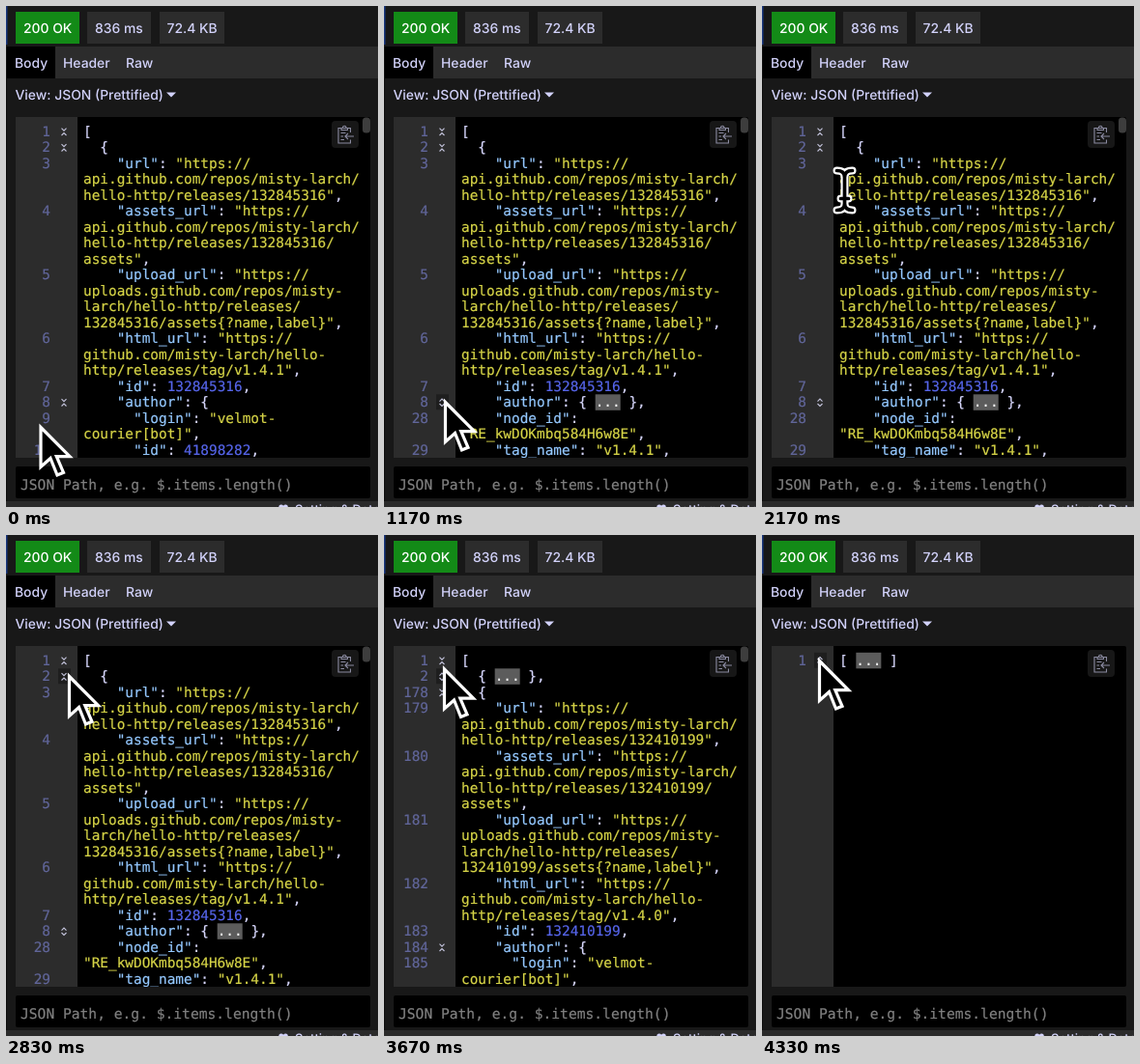
Recreate the animation shown at these times as an HTML page. Size 385 by 519 pixels, loop 4.67 s.

```html
<!DOCTYPE html>
<html lang="en">
<head>
<meta charset="utf-8">
<title>JSON folding</title>
<style>
html, body { margin: 0; width: 100%; height: 100%; overflow: hidden; background: #181818; }
svg { display: block; }
text { white-space: pre; text-rendering: geometricPrecision; }
.ui { font: 500 13.9px Inter, sans-serif; fill: #d2d2fa; }
.mono {
  font-family: "DejaVu Sans Mono", monospace; font-size: 14.4px;
  fill: currentColor; stroke: currentColor; stroke-width: 0.2;
}
.key { color: #94c8ff; }
.str { color: #d6d447; }
.num { color: #5665ea; }
.dots { color: #f0f0f0; }
.punct { color: #d6d6fb; }
.line { color: #61669a; text-anchor: end; }
.hint { color: #808080; font-size: 14.62px; }
.fold { fill: none; stroke: #c4c4dc; stroke-width: 1.1; }
</style>
</head>
<body>
<svg width="385" height="519" viewBox="0 0 385 519">
  <defs><clipPath id="pane"><rect x="10" y="115" width="367" height="353"/></clipPath></defs>
  <rect width="385" height="519" fill="#181818"/>
  <rect width="1.5" height="40" fill="#16347c"/>
  <rect x="10" y="6" width="66" height="33" fill="#138a17"/>
  <rect x="84" y="6" width="66" height="33" fill="#2c2c2c"/>
  <rect x="159" y="6" width="67" height="33" fill="#2c2c2c"/>
  <rect x="1" y="42" width="384" height="33" fill="#2c2c2c"/>
  <rect x="1" y="42" width="50" height="33" fill="#000"/>
  <rect y="42" width="1" height="477" fill="#0c0c0c"/>
  <g class="ui">
    <text x="18" y="27.700" fill="#fff">200 OK</text>
    <text x="92" y="27.700">836 ms</text>
    <text x="166.500" y="27.700">72.4 KB</text>
    <text x="9" y="64">Body</text>
    <text x="59" y="64">Header</text>
    <text x="124" y="64">Raw</text>
    <text x="9.500" y="96.700">View: JSON (Prettified)</text>
    <path d="M166 89.500h10l-5 5z"/>
  </g>
  <rect x="10" y="115" width="367" height="353" rx="2" fill="#000"/>
  <rect x="10" y="115" width="64" height="353" fill="#2c2c2c"/>
  <g id="code" clip-path="url(#pane)"></g>
  <rect id="thumb" x="369" y="115.500" width="8" height="16" rx="3.500" fill="#3d3d3d"/>
  <rect x="337" y="119" width="28" height="28" rx="4" fill="#171717"/>
  <g fill="none" stroke="#8a8aa0" stroke-width="1.100">
    <path d="M356.500 131v-4.500h-12.500v15.500h12.500v-3.500M347 126.500v2h6.500v-2M348.500 126a1.750 1.750 0 0 1 3.500 0"/>
    <path d="M360 135h-9M354 132l-3 3 3 3M346.500 131.500h5M346.500 135h2.500M346.500 138.500h3.500"/>
  </g>
  <rect x="10" y="477" width="367" height="33" rx="2" fill="#000"/>
  <text class="mono hint" x="15" y="501.300">JSON Path, e.g. $.items.length()</text>
  <rect y="513" width="385" height="6" fill="#2a2a2a"/>
  <g class="ui">
    <circle cx="284.800" cy="519" r="2.500"/>
    <circle cx="289.300" cy="519" r="2.500"/>
    <text x="299" y="526" style="font-size:13px">Setting &amp; Data</text>
  </g>
  <path id="arrow" d="M1.500 3.500V44.500L11.500 35.500 18.500 53 25 50.300 17.800 33.700H31.500Z"
    fill="#000" stroke="#fff" stroke-width="3.200"/>
  <g id="beam" fill="none" stroke-linecap="round"></g>
</svg>
<script>
const $ = id => document.getElementById(id);
const LOOP = 4670, LAST = 27;
const TOP = 115, ROW = 16.5, LEFT = 80, ADV = 14.4 * 0.602;
const USER = 'misty-larch', BOT = ['velmot-', 'courier[bot]'];

// A row is [line number, text, fold mark]; wrapped rows have no number.
function release(id, tag, n, authorFolded) {
  const [a, b] = USER.split('-');
  const rows = [
    [n, '  {', 'open'],
    [n + 1, '    "url": "https://'],
    ['', `api.github.com/repos/${USER}/`],
    ['', `hello-http/releases/${id}",`],
    [n + 2, '    "assets_url": "https://'],
    ['', `api.github.com/repos/${USER}/`],
    ['', `hello-http/releases/${id}/`],
    ['', 'assets",'],
    [n + 3, '    "upload_url": "https://'],
    ['', `uploads.github.com/repos/${a}-`],
    ['', `${b}/hello-http/releases/`],
    ['', `${id}/assets{?name,label}",`],
    [n + 4, '    "html_url": "https://'],
    ['', `github.com/${USER}/hello-`],
    ['', `http/releases/tag/${tag}",`],
    [n + 5, `    "id": ${id},`]
  ];
  return rows.concat(authorFolded ? [
    [n + 6, '    "author": { ... },', 'closed'],
    [n + 26, '    "node_id":'],
    ['', '"RE_kwDOKmbq584H6w8E",'],
    [n + 27, `    "tag_name": "${tag}",`]
  ] : [
    [n + 6, '    "author": {', 'open'],
    [n + 7, `      "login": "${BOT[0]}`],
    ['', `${BOT[1]}",`],
    [n + 8, '      "id": 41898282,']
  ]);
}

const views = [
  [[1, '[', 'open'], ...release(132845316, 'v1.4.1', 2, false)],
  [[1, '[', 'open'], ...release(132845316, 'v1.4.1', 2, true)],
  [[1, '[', 'open'], [2, '  { ... },', 'closed'], ...release(132410199, 'v1.4.0', 178, false)],
  [[1, '[ ... ]', 'closed']]
];

const TOKEN = /(?<key>"\w+"(?=:))|(?<str>"[^"]*"?|^[^\s"\[{][^"]*"?)|(?<num>\b\d+\b)|(?<dots>\.{3})|(?<punct>[^\s"\w]+)/g;
const MARK = {
  open: 'M-2.500-3.700L0-1.200 2.500-3.700M-2.500 3.700L0 1.200 2.500 3.700',
  closed: 'M-2.500-1.200L0-3.700 2.500-1.200M-2.500 1.200L0 3.700 2.500 1.200'
};

function drawRow([num, text, mark], i, hover) {
  const mid = TOP + 14.8 + i * ROW, base = mid + 5;
  let out = `<text class="mono line" x="46" y="${base}">${num}</text>`;
  if (hover && mark) out += `<rect x="54" y="${mid - 8}" width="13" height="16" fill="#1e1e1e"/>`;
  if (mark) out += `<path class="fold" d="${MARK[mark]}" transform="translate(60 ${mid + 0.5})"/>`;
  for (const m of text.matchAll(TOKEN)) {
    const kind = Object.keys(m.groups).find(k => m.groups[k]);
    const x = LEFT + m.index * ADV;
    if (kind === 'dots') out += `<rect x="${x}" y="${mid - 8}" width="${3 * ADV}" height="16.5" fill="#5c5c5c"/>`;
    out += `<text class="mono ${kind}" x="${x}" y="${base}">${m[0]}</text>`;
  }
  return out;
}

const BEAM = 'M-8-20.500Q0-20.500 0-13.500Q0-20.500 8-20.500M0-13.500V13.500M-8 20.500Q0 20.500 0 13.500Q0 20.500 8 20.500M-4 8.500H4';
$('beam').innerHTML = `<path d="${BEAM}" stroke="#fff" stroke-width="8"/><path d="${BEAM}" stroke="#000" stroke-width="3.700"/>`;

// Pointer path: tick, x, y
const path = [
  [0, 34.5, 433], [4, 66, 406], [5, 63, 406.5], [6, 62, 407], [10, 62, 407], [13, 85.5, 191],
  [16, 65, 146], [17, 64, 143], [19, 64, 143], [20, 63, 140], [21, 63, 140], [22, 61, 135.5],
  [24, 58, 127], [28, 58, 127]
];

function pointer(tick) {
  const i = path.findIndex(p => p[0] > tick);
  const [a, b] = [path[i - 1], path[i]];
  const u = (tick - a[0]) / (b[0] - a[0]), e = u * u * (3 - 2 * u);
  return [a[1] + (b[1] - a[1]) * e, a[2] + (b[2] - a[2]) * e];
}

// The row under the pointer lights up one tick late.
function hoverRow(tick) {
  const [x, y] = pointer(Math.max(0, tick - 1));
  return x > 54 && x < 65.5 ? Math.floor((y - TOP - 7) / ROW) : -1;
}

const stamp = k => Math.round(k * 100 / 6) * 10;

function tickAt(t) {
  let k = LAST;
  while (stamp(k) > t) k--;
  return k;
}

let shown = '';
function render(t) {
  const tick = tickAt(t);
  const view = [7, 19, 26].filter(k => tick >= k).length;
  const [x, y] = pointer(tick);
  const overText = x > 74;
  const hover = hoverRow(tick);
  const state = view + ':' + hover;
  if (state !== shown) {
    $('code').innerHTML = views[view].map((r, i) => drawRow(r, i, i === hover)).join('');
    $('thumb').style.display = view === 3 ? 'none' : '';
    shown = state;
  }
  const place = `translate(${x} ${y})`;
  $('arrow').setAttribute('transform', place);
  $('beam').setAttribute('transform', place);
  $('arrow').style.display = overText ? 'none' : '';
  $('beam').style.display = overText ? '' : 'none';
}

const start = performance.now();
function loop() {
  render((performance.now() - start) % LOOP);
  requestAnimationFrame(loop);
}
loop();
</script>
</body>
</html>
```
